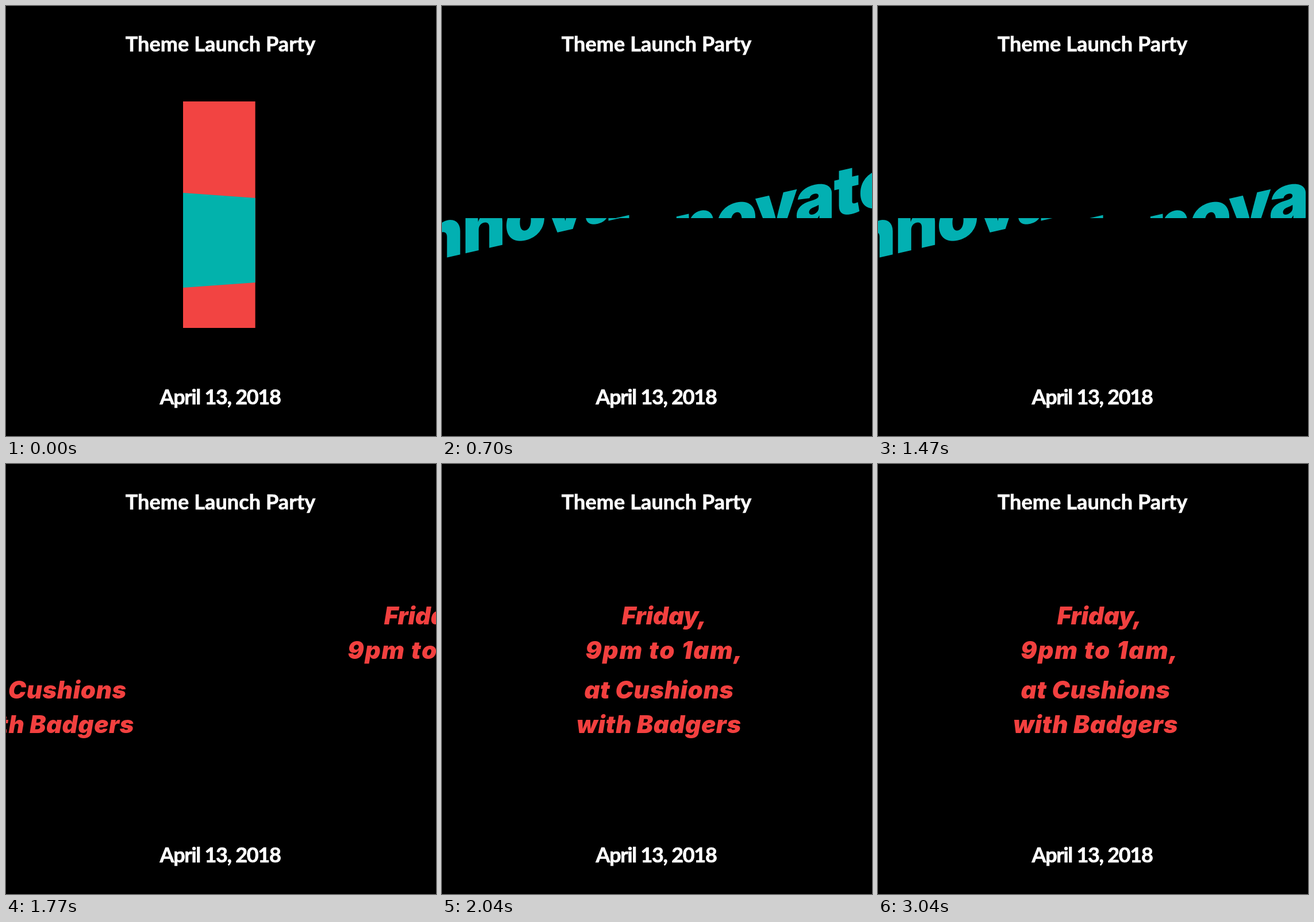
These frames come from a looping animation (748 by 748 pixels, 3.08 s). An HTML page:

```html
<!DOCTYPE html>
<html lang="en">
<head>
<meta charset="utf-8">
<title>Theme Launch Party</title>
<style>
  html, body { margin: 0; width: 100%; height: 100%; overflow: hidden; background: #000; }
  svg { display: block; width: 100vw; height: 100vh; }
  text { text-anchor: middle; }
  .caption { font: 700 36px Lato, sans-serif; fill: #fff; stroke: #fff; stroke-width: .7px; }
  .word { font: 900 117px Inter, sans-serif; letter-spacing: -2.5px; fill: #02b0b2; }
  .details { font: italic 900 42px Inter, sans-serif; letter-spacing: .6px; fill: #f2403f; }
</style>
</head>
<body>
<svg viewBox="0 0 748 748">
  <defs>
    <clipPath id="upper"><rect width="748" height="369"/></clipPath>
    <clipPath id="lower"><rect y="369" width="748" height="379"/></clipPath>
    <g id="bar">
      <rect x="308" y="166" width="125.6" height="394" fill="#f24442"/>
      <path d="M308 325L433.6 334V481L308 490Z" fill="#02b2ac"/>
    </g>
    <text id="word" class="word" transform="translate(368 399) skewY(-12.8)">Innovate</text>
  </defs>
  <rect width="748" height="748"/>
  <g clip-path="url(#upper)">
    <use id="barTop" href="#bar"/>
    <use id="wordTop" href="#word"/>
    <g id="detailsTop" class="details">
      <text x="385.5" y="279" style="letter-spacing: -.2px">Friday,</text>
      <text x="386" y="339" style="letter-spacing: 1.8px">9pm to 1am,</text>
    </g>
  </g>
  <g clip-path="url(#lower)">
    <use id="barBottom" href="#bar"/>
    <use id="wordBottom" href="#word"/>
    <g id="detailsBottom" class="details">
      <text x="378.5" y="408">at Cushions</text>
      <text x="378.5" y="468">with Badgers</text>
    </g>
  </g>
  <text class="caption" x="373" y="79" letter-spacing=".1">Theme Launch Party</text>
  <text class="caption" x="372.5" y="693" letter-spacing="-1.3">April 13, 2018</text>
</svg>
<script>
  const LOOP = 3080, STEP = 33.4;

  const progress = (t, start, length) => Math.min(1, Math.max(0, (t - start) / length));
  const leave = (t, start, length) => progress(t, start, length) ** 3;
  const arrive = (t, start, length) => (1 - progress(t, start, length)) ** 3;

  // Moves the two halves of a scene in opposite directions.
  function place(name, visible, top, bottom) {
    for (const [half, x] of [["Top", top], ["Bottom", bottom]]) {
      const node = document.getElementById(name + half);
      node.setAttribute("visibility", visible ? "visible" : "hidden");
      node.setAttribute("transform", `translate(${x.toFixed(2)} 0)`);
    }
  }

  function render(ms) {
    // The picture advances in steps of about 30 frames a second.
    const t = Math.floor((ms % LOOP + 5) / STEP) * STEP;

    const barOut = leave(t, 0, 500);
    place("bar", t < 500, -499 * barOut, 522 * barOut);

    const wordIn = arrive(t, 590, 300), wordOut = leave(t, 1190, 400);
    place("word", t > 590 && t < 1590,
      712 * wordIn + 711 * wordOut, -765 * wordIn - 574 * wordOut);

    const detailsIn = arrive(t, 1685, 400);
    place("details", t > 1685, 710 * detailsIn, -613 * detailsIn);
  }

  const began = performance.now();
  function tick() {
    render(performance.now() - began);
    requestAnimationFrame(tick);
  }
  tick();
</script>
</body>
</html>
```
